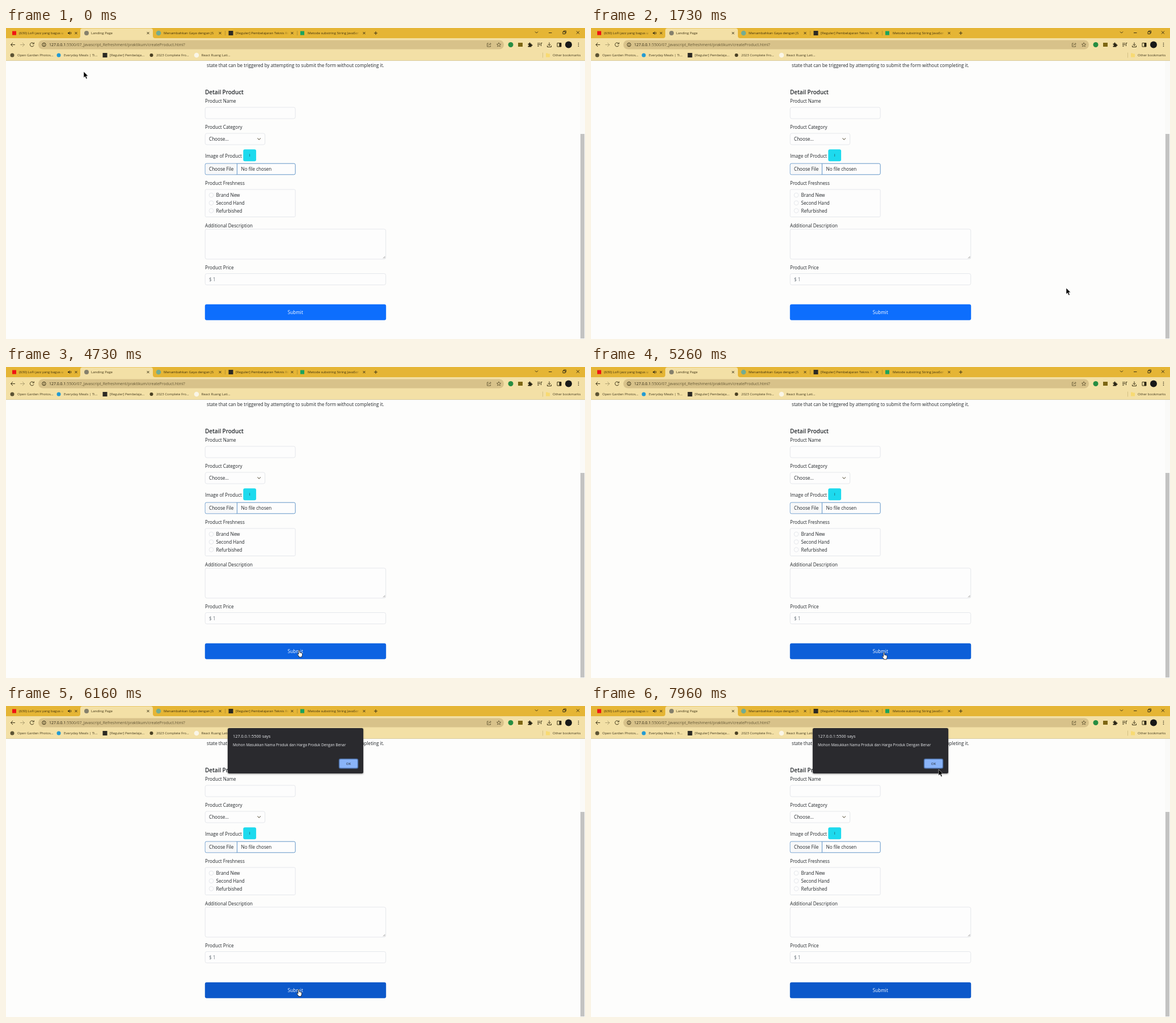
Animation, 1021 px wide and 549 px high, one loop 8 s. Source, as an HTML page:

```html
<!DOCTYPE html>
<html lang="en">
<head>
<meta charset="utf-8">
<title>Product form</title>
<style>
  html, body { margin: 0; width: 100%; height: 100%; overflow: hidden; background: #fdfdfc; }
  svg { display: block; width: 1021px; height: 549px; }
  text { font-family: "Open Sans", "Noto Sans", sans-serif; white-space: pre; }
  .tab { font-size: 6.08px; fill: #3d3010; }
  .mark { font-size: 6px; fill: #40371c; }
  .form { font-size: 8.15px; fill: #212529; }
  .box { fill: #fdfdfd; stroke: #e2e5e9; stroke-width: .9; }
  .ico { fill: none; stroke: #3b3216; stroke-width: 1; }
  .mid { text-anchor: middle; }
</style>
</head>
<body>
<svg viewBox="0 0 1021 549">
  <defs>
    <linearGradient id="fade">
      <stop offset="0" stop-color="#e5b535" stop-opacity="0"/>
      <stop offset=".45" stop-color="#e5b535"/>
    </linearGradient>
    <filter id="shadow" x="-10%" y="-10%" width="120%" height="130%">
      <feDropShadow dx="0" dy="1" stdDeviation="1.5" flood-opacity=".45"/>
    </filter>
  </defs>
  <rect width="1021" height="549" fill="#fdfdfc"/>

  <!-- tab strip -->
  <rect width="1021" height="18" fill="#e5b535"/>
  <path d="M127 18Q131 18 131 14V4.500Q131 .5 135 .5H255Q259 .5 259 4.500V14Q259 18 263 18Z" fill="#f3e0a6"/>
  <g class="tab">
    <text x="23" y="11.200">(630) LoFi jazz yang bagus u</text>
    <text x="150" y="11.200">Landing Page</text>
    <text x="278" y="11.200">Menambahkan Gaya dengan JS</text>
    <text x="405" y="11.200">[Reguler] Pembelajaran Teknis Re</text>
    <text x="532" y="11.200">Metode substring String JavaScr</text>
  </g>
  <g fill="url(#fade)">
    <rect x="95" y="2" width="22" height="14"/>
    <rect x="488" y="2" width="24" height="14"/>
    <rect x="615" y="2" width="24" height="14"/>
  </g>
  <rect x="11" y="5.500" width="7" height="7" fill="#f01414"/>
  <circle cx="142" cy="9" r="4" fill="#85806c"/>
  <circle cx="269" cy="9" r="4.300" fill="#74ac91"/>
  <rect x="392.500" y="5" width="8" height="8" fill="#2c2a24"/>
  <rect x="519" y="5.500" width="7" height="7" fill="#1ba35d"/>
  <path d="M109 8H110.500L112.500 6V12L110.500 10H109Z" fill="#3b3216"/>
  <path d="M114 7Q115.500 9 114 11" class="ico" stroke-width=".7"/>
  <path d="M386.500 5V13M513.500 5V13" stroke="#a6842c" stroke-width=".7"/>
  <g id="closers" class="ico"></g>
  <path class="ico" d="M649 9H655M652 6V12M933 6.500L935.500 9 938 6.500M957 8.500H962.500M982 6.500H986V10.500H982ZM983.500 6.500V5H987.500V9H986M1006 5.500L1011 10.500M1011 5.500L1006 10.500"/>

  <!-- toolbar -->
  <rect y="18" width="1021" height="39" fill="#f3e0a6"/>
  <rect y="57" width="1021" height="1" fill="#d9cba0"/>
  <rect x="57" y="21.500" width="821" height="16" rx="8" fill="#d8c28a"/>
  <path class="ico" stroke-width="1.200" d="M16 29.500H8.500M12 26L8.500 29.500 12 33M48.500 27.300A3.400 3.400 0 1 0 49 30.500M49.300 25.500V28H46.700"/>
  <path class="ico" opacity=".35" d="M25 29.500H32.500M29 26L32.500 29.500 29 33"/>
  <circle class="ico" cx="67" cy="29.500" r="3.200" stroke-width=".8"/>
  <path class="ico" stroke-width=".8" d="M67 29V31.300M67 27.500V28.300"/>
  <text x="76" y="32" font-size="6.950" fill="#665a37"><tspan fill="#2b2410">127.0.0.1</tspan>:5500/07_Javascript_Refreshment/praktikum/createProduct.html?</text>
  <g class="ico" opacity=".65">
    <path d="M851 27H848.500V33H854.500V31M850.500 31Q851 28 855 28M853.500 26.300L855.300 28 853.500 29.700"/>
    <path d="M869 25.800L870.100 28.300 872.700 28.500 870.700 30.200 871.300 32.800 869 31.400 866.700 32.800 867.300 30.200 865.300 28.500 867.900 28.300Z"/>
  </g>
  <circle cx="890" cy="29.500" r="4.500" fill="#278d42"/>
  <rect x="903" y="26" width="8" height="7" fill="#7d6613"/>
  <path d="M920.500 27.500H922.500Q922 25.500 923.500 25.500T924.500 27.500H926.500V29.300Q928.500 29 928.500 30.500T926.500 31.500V33.500H920.500V31.500Q922.300 31.800 922.300 30.500T920.500 29.500Z" fill="#292414"/>
  <path class="ico" d="M937 27H942M937 29.500H942M937 32H940M943.500 32V26.500H945.500M958 25.500V31M955.500 28.700L958 31.200 960.500 28.700M954.500 31V33.500H961.500V31M972 26.500H979V33H972Z"/>
  <rect x="975.500" y="26.500" width="3.500" height="6.500" fill="#292414"/>
  <circle cx="992" cy="29.500" r="6" fill="#171818"/>
  <g fill="#292414"><circle cx="1009.500" cy="26.700" r=".8"/><circle cx="1009.500" cy="29.500" r=".8"/><circle cx="1009.500" cy="32.300" r=".8"/></g>

  <!-- bookmarks -->
  <circle cx="11" cy="48" r="3.500" fill="#5c5334"/>
  <circle cx="93" cy="48" r="3.500" fill="#249bd2"/>
  <rect x="170.500" y="44" width="8" height="8" fill="#2c2a24"/>
  <circle cx="256.500" cy="48" r="3" fill="#4a4023"/>
  <circle cx="336" cy="48" r="4.300" fill="#faf5e6"/>
  <path d="M952 44.500H955L956 45.500H959V51.500H952Z" fill="#f8da72"/>
  <path d="M946.500 43.500V52.500" stroke="#cbb87c" stroke-width=".8"/>
  <g class="mark">
    <text x="20" y="50.200">Open Garden Photos...</text>
    <text x="102" y="50.200">Everyday Meals | Ti...</text>
    <text x="183" y="50.200">[Reguler] Pembelaja...</text>
    <text x="265" y="50.200">2023 Complete Fro...</text>
    <text x="344.500" y="50.200">React Ruang Lati...</text>
    <text x="964" y="50.200">Other bookmarks</text>
  </g>

  <!-- page -->
  <rect x="1012" y="58" width="9" height="491" fill="#fafaf8"/>
  <rect x="1013" y="187" width="7" height="361" fill="#c3c3c2"/>
  <g class="box">
    <rect x="351.200" y="140" width="159" height="20" rx="3"/>
    <rect x="351.200" y="186" width="105.500" height="20" rx="3"/>
    <rect x="351.200" y="285" width="159" height="48.500" rx="2"/>
    <rect x="351.200" y="355" width="318.500" height="53" rx="3"/>
    <rect x="351.200" y="433.500" width="318.500" height="20" rx="3"/>
    <circle cx="362" cy="295" r="3.900"/>
    <circle cx="362" cy="308.800" r="3.900"/>
    <circle cx="362" cy="322.500" r="3.900"/>
  </g>
  <path class="ico" d="M443.500 194.500L446.200 197.200 449 194.500" stroke-width="1.100"/>
  <rect x="418.300" y="214.200" width="22.800" height="21" rx="3" fill="#1ddaee"/>
  <g stroke="#5089c2" stroke-width=".9">
    <rect x="351.200" y="239.200" width="159" height="19.600" rx="2.500" fill="#fdfdfd"/>
    <path d="M407.500 239.500V258.500"/>
  </g>
  <rect x="351.700" y="239.700" width="55.300" height="18.600" rx="2" fill="#f7f8f9"/>
  <path d="M665 406.500L668.500 403M667 406.500L668.500 405" stroke="#777" stroke-width=".7"/>
  <g class="form">
    <text x="354" y="68.800">state that can be triggered by attempting to submit the form without completing it.</text>
    <text x="351" y="116.700" font-size="9.900" font-weight="550">Detail Product</text>
    <text x="351" y="132.400">Product Name</text>
    <text x="351" y="178.400">Product Category</text>
    <text x="358" y="198.900">Choose...</text>
    <text x="351" y="228.700">Image of Product</text>
    <text x="429.800" y="227.300" class="mid" style="font-size:6.500px">i</text>
    <text x="358" y="252.100">Choose File</text>
    <text x="414.500" y="252.100">No file chosen</text>
    <text x="351" y="277.200">Product Freshness</text>
    <text x="370.500" y="298">Brand New</text>
    <text x="370.500" y="311.900">Second Hand</text>
    <text x="370.500" y="325.700">Refurbished</text>
    <text x="351" y="351.700">Additional Description</text>
    <text x="351" y="426.200">Product Price</text>
    <text x="358" y="446.700" fill="#6c757d">$ 1</text>
    <rect id="submit" x="350.800" y="487.800" width="319.400" height="27.900" rx="3"/>
    <text x="510.300" y="505" class="mid" fill="#fff">Submit</text>
  </g>

  <g id="dialog">
    <rect x="391" y="39" width="239" height="80" rx="2.500" fill="#292a2d" filter="url(#shadow)"/>
    <text x="400" y="56.200" font-size="7.350" fill="#e8eaed">127.0.0.1:5500 says</text>
    <text x="400" y="71.300" font-size="6.500" fill="#e8eaed">Mohon Masukkan Nama Produk dan Harga Produk Dengan Benar</text>
    <rect x="587.500" y="93.500" width="33" height="16.500" rx="2.500" fill="#8ab4f8" stroke="#4c6fa6" stroke-width="1.500"/>
    <text x="604" y="104" class="mid" font-size="6" fill="#202124">OK</text>
  </g>

  <g id="cursor" stroke-linejoin="round">
    <path id="arrow" d="M0 0V10.800L2.500 8.500 4.300 12.700 6.200 11.900 4.400 7.800H7.700Z" stroke="#fff" stroke-width=".5"/>
    <path id="hand" d="M-1 1Q0-.4 1 1V4.500L4 5.100Q5.500 5.400 5.500 6.900V9Q5.400 10 4.600 11V12.500H-.4V11.300Q-1.800 9.600-3.200 7.600-3 6-1 7.600Z" fill="#fff" stroke="#111" stroke-width=".8"/>
    <path id="beam" d="M-2-5H2M0-5V5M-2 5H2" fill="none" stroke="#222" stroke-width=".8"/>
  </g>
</svg>
<script>
const $ = id => document.getElementById(id);
const LOOP = 8000, HOVER = 4620, PRESS = 5860, ALERT = 6120;
const IDLE = [13, 110, 253], OVER = [13, 95, 216], DOWN = [12, 88, 202];

// Pointer route: time, x, y
const route = [
  [0, 137, 77], [60, 137, 77], [840, 1010, 506], [1620, 838, 459], [2560, 838, 459],
  [3330, 622, 338], [4150, 560, 450], [4730, 517, 499.500], [5010, 517, 506],
  [5600, 516, 500], [6720, 516, 500], [7060, 526, 467.500],
  [7500, 547, 409], [7900, 613, 112], [8000, 613, 112]
];
// Fields that show a text beam: x, y, width, height
const fields = [[351, 140, 159, 20], [351, 355, 319, 53], [351, 433, 319, 21]];

$('closers').innerHTML = [123.500, 250.500, 377.500, 504.500, 631.500].map(x =>
  `<path d="M${x - 2} 7L${x + 2} 11M${x + 2} 7L${x - 2} 11"/>`).join('');

const clamp = v => Math.max(0, Math.min(1, v));
const mix = (a, b, k) => a.map((v, i) => v + (b[i] - v) * k);
const inside = (x, y, [l, t, w, h]) => x >= l && x <= l + w && y >= t && y <= t + h;

// Slope at a route point; zero at rests and turning points
function slope(i, axis) {
  const a = route[i - 1], b = route[i], c = route[i + 1];
  if (!a || !c) return 0;
  const before = (b[axis] - a[axis]) / (b[0] - a[0]);
  const after = (c[axis] - b[axis]) / (c[0] - b[0]);
  return before * after <= 0 ? 0 : 2 * before * after / (before + after);
}

function along(t, axis) {
  const i = Math.max(0, route.findIndex(p => p[0] > t) - 1);
  const a = route[i], b = route[i + 1], d = b[0] - a[0], k = (t - a[0]) / d;
  const s = k * k * (3 - 2 * k);
  return a[axis] + (b[axis] - a[axis]) * s
    + d * k * (1 - k) * ((1 - k) * slope(i, axis) - k * slope(i + 1, axis));
}

function pointer(t, x, y) {
  if (t >= ALERT) return y < 119 ? 'arrow' : 'hand';
  if (inside(x, y, [351, 488, 319, 28])) return 'hand';
  return fields.some(f => inside(x, y, f)) ? 'beam' : 'arrow';
}

function draw(now) {
  const t = now % LOOP, x = along(t, 1), y = along(t, 2), shape = pointer(t, x, y);
  $('cursor').setAttribute('transform', `translate(${x} ${y})`);
  for (const id of ['arrow', 'hand', 'beam']) $(id).style.display = id === shape ? '' : 'none';
  const hover = mix(IDLE, OVER, clamp((t - HOVER) / 150));
  $('submit').style.fill = `rgb(${mix(hover, DOWN, clamp((t - PRESS) / 100)).map(Math.round)})`;
  $('dialog').style.display = t >= ALERT ? '' : 'none';
  requestAnimationFrame(draw);
}
requestAnimationFrame(draw);
</script>
</body>
</html>
```
